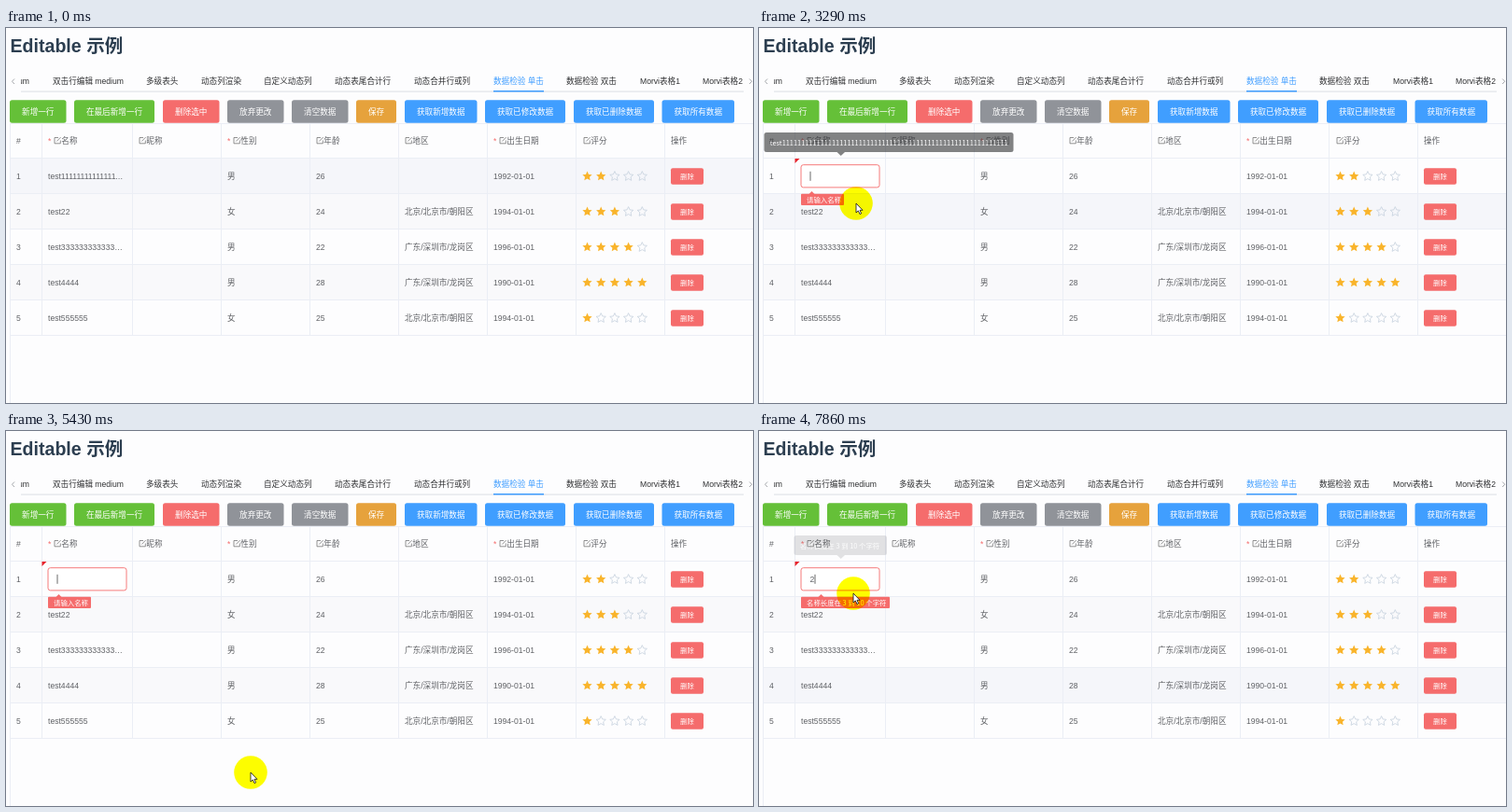
Animation, 800 px wide and 402 px high, one loop 8000 ms. Source, as an HTML page:

```html
<!DOCTYPE html>
<html lang="zh-CN">
<head>
<meta charset="utf-8">
<style>
html, body { margin: 0; width: 100%; height: 100%; overflow: hidden; background: #fdfdfe; }
svg { display: block; font: 8.6px "Liberation Sans", "Noto Sans CJK SC", "Noto Sans CJK", sans-serif; font-kerning: none; }
.tip { font: 7.4px "Noto Sans CJK SC", "Noto Sans CJK", sans-serif; }
.ones { letter-spacing: -.074em; }
.spot { mix-blend-mode: multiply; }
</style>
</head>
<body>
<svg id="stage" width="800" height="402" viewBox="0 0 800 402"></svg>
<script>
const stage = document.getElementById('stage');
const LOOP = 8000, STEPS = 56;
const GREEN = '#65c038', RED = '#f56c6c', GRAY = '#909399', AMBER = '#e6a23c', BLUE = '#409eff';
const INK = '#606266', LINE = '#ebeef5', TOP = 140, ROW = 38;

const rect = (x, y, w, h, fill, more = '') =>
  `<rect x="${x}" y="${y}" width="${w}" height="${h}" fill="${fill}" ${more}/>`;
const text = (x, y, s, fill = INK, more = '') => `<text x="${x}" y="${y}" fill="${fill}" ${more}>${s}</text>`;
const path = (d, fill, more = '') => `<path d="${d}" fill="${fill}" ${more}/>`;
const stroke = (d, color, width = 1) => path(d, 'none', `stroke="${color}" stroke-width="${width}"`);
const MID = 'text-anchor="middle"';

const tabs = [[50, '双击行编辑 medium'], [150, '多级表头'], [209, '动态列渲染'], [276, '自定义动态列'],
  [352, '动态表尾合计行'], [437, '动态合并行或列'], [522, '数据检验 单击'], [600, '数据检验 双击'],
  [679, 'Morvi表格1'], [746, 'Morvi表格2']];
const buttons = [[4, 60.5, '新增一行', GREEN], [73, 86, '在最后新增一行', GREEN], [168, 60.5, '删除选中', RED],
  [237, 60.5, '放弃更改', GRAY], [306, 60.5, '清空数据', GRAY], [375, 43, '保存', AMBER],
  [427, 77.5, '获取新增数据', BLUE], [513, 86, '获取已修改数据', BLUE], [608, 86, '获取已删除数据', BLUE],
  [702.5, 77.5, '获取所有数据', BLUE]];
// x, label, required
const heads = [[45, '名称', 1], [142, '昵称'], [237, '性别', 1], [332, '年龄'], [427, '地区'],
  [522, '出生日期', 1], [618, '评分']];
const rows = [
  ['test' + '1'.repeat(14) + '…', '男', 26, '', 1992, 2],
  ['test22', '女', 24, '北京/北京市/朝阳区', 1994, 3],
  ['test' + '3'.repeat(12) + '…', '男', 22, '广东/深圳市/龙岗区', 1996, 4],
  ['test4444', '男', 28, '广东/深圳市/龙岗区', 1990, 5],
  ['test555555', '女', 25, '北京/北京市/朝阳区', 1994, 1]];
// step, x, y of the pointer
const track = [[1, 384, 74], [3, 150, 140], [5, 100, 157], [8, 97, 158], [10, 121, 160], [12, 72, 165],
  [14, 90, 179], [21, 90, 179], [22, 102, 187], [23, 104, 188], [28, 200, 345], [32, 215, 354],
  [36, 262, 366], [38, 262, 366], [42, 110, 190], [44, 91, 165], [47, 90, 165], [51, 250, 384],
  [53, 250, 378], [54, 170, 270], [55, 101, 174]];

function pointer(k) {
  const i = track.findIndex(p => p[0] >= k);
  if (i < 1) return track[0].slice(1);
  const [a, ax, ay] = track[i - 1], [b, bx, by] = track[i];
  const u = (k - a) / (b - a), e = u * u * (3 - 2 * u);
  return [ax + (bx - ax) * e, ay + (by - ay) * e];
}

function hoverRow(k) {
  if (k < 3) return 0;
  const y = pointer(k - 1)[1];
  return y >= TOP && y < 185 ? 0 : y < TOP ? -1 : Math.floor((y - TOP) / ROW);
}

function star(cx, cy, full) {
  let d = '';
  for (let i = 0; i < 10; i++) {
    const r = i % 2 ? 2.6 : 5.4, a = i * Math.PI / 5;
    d += `${i ? 'L' : 'M'}${(cx + r * Math.sin(a)).toFixed(2)} ${(cy - r * Math.cos(a)).toFixed(2)}`;
  }
  return full ? path(d + 'Z', '#f9b42b') : stroke(d + 'Z', '#c6d1de', .8);
}

function topBar() {
  let s = text(4.5, 26, 'Editable 示例', '#2c3e50', 'font-size="19.6" font-weight="bold"');
  s += rect(16, 67.5, 774, 1.2, '#e1e4ea') + rect(522, 67, 54, 1.5, BLUE);
  s += `<svg x="16" y="45" width="774" height="20" viewBox="16 45 774 20">${text(25, 59.7, 'medium', '#303133', 'text-anchor="end"')}</svg>`;
  s += stroke('M9 54.5L6.5 57.2L9 60M796.2 54.5L798.7 57.2L796.2 60', GRAY, .8);
  for (const [x, t] of tabs) s += text(x, 59.7, t, x === 522 ? BLUE : '#303133');
  for (const [x, w, t, c] of buttons)
    s += rect(x, 77.3, w, 24.5, c, 'rx="2.5"') + text(x + w / 2, 92.8, t, '#fff', MID);
  return s;
}

function table(hover, editing) {
  let s = '';
  rows.forEach((r, i) => {
    const y = TOP + i * ROW, fill = i === hover ? '#f5f6fa' : i % 2 ? '#f9f9fb' : '#fdfdfe';
    s += rect(5, y, 795, ROW, fill);
  });
  let grid = 'M4.5 102V402M4 102.5H800';
  for (let i = 0; i < 6; i++) grid += `M4 ${TOP + i * ROW - .5}H800`;
  for (const x of [38, 135, 230, 325, 420, 515, 610, 705]) grid += `M${x + .5} 102V330`;
  s += stroke(grid, LINE);

  s += text(11, 124, '#') + text(712, 124, '操作');
  for (const [x, t, need] of heads) {
    const ix = need ? x + 6 : x;
    if (need) s += text(x, 124, '*', RED);
    s += `<g transform="translate(${ix} 116.5)">${stroke('M5 1H1v6.3h6.3V4M3.3 5L7.6 .6', '#777', .8)}</g>`;
    s += text(ix + 8.3, 124, t);
  }
  rows.forEach(([name, sex, age, area, year, score], i) => {
    const cy = TOP + ROW / 2 + i * ROW, y = cy + 3;
    s += text(11, y, i + 1);
    if (i || !editing) s += text(45, y, i ? name : `test<tspan class="ones">${name.slice(4)}</tspan>`);
    s += text(237, y, sex) + text(332, y, age) + text(427, y, area) + text(522, y, year + '-01-01');
    for (let n = 0; n < 5; n++) s += star(622.5 + n * 14.7, cy, n < score);
    s += rect(712, cy - 8.8, 35, 17.5, RED, 'rx="2"') + text(729.5, cy + 2.8, '删除', '#fff', MID + ' font-size="7.4"');
  });
  return s;
}

function editor(k, px) {
  const blank = k >= 18 && k < 48, typed = k >= 48;
  let s = rect(45, 146.7, 84, 24.2, '#fff', `rx="2.5" stroke="${RED}" stroke-width=".9"`);
  if (k >= 22) s += path('M38.5 140H43.5L38.5 145Z', '#e8232b');
  if (k < 18) {
    const ones = color => text(119.4, 162, '1'.repeat(18), color, 'class="ones" text-anchor="end"');
    const clip = (x, body) => `<svg x="${x}" y="148" width="${120 - x}" height="22" viewBox="${x} 148 ${120 - x} 22">${body}</svg>`;
    s += clip(54, ones(INK));
    if (k > 10) {
      const from = k >= 12 ? 54 : Math.max(54, px);
      s += clip(from, rect(from, 153.5, 119 - from, 10.5, '#3a8ff0') + ones('#fff'));
    } else s += rect(119, 154, .7, 10, '#444');
    s += path('M54 163.8H119', 'none', 'stroke="#e8474c" stroke-width=".9" stroke-dasharray="1.6 .8"');
  } else {
    if (typed) s += text(54.5, 162, '2');
    s += rect(typed ? 59.6 : 54.6, 153.8, .8, 10, '#444');
  }
  const w = blank ? 46 : 95, ax = blank ? 56.5 : 66.5;
  s += rect(45, 177.7, w, 12.3, RED, 'rx="1"') + path(`M${ax - 3} 178L${ax} 175L${ax + 3} 178Z`, RED);
  s += text(51, 186.6, blank ? '请输入名称' : '名称长度在 3 到 10 个字符', '#fff', 'class="tip"');
  return s;
}

function tooltip(x, w, t, opacity) {
  return `<g opacity="${opacity}">${rect(x, 112, w, 21, '#303133', 'rx="2.5"')}${path('M83.5 133H92L87.7 137Z', '#303133')}${text(x + 6.3, 125.5, t, '#fff', 'class="tip"')}</g>`;
}

function cursor(k, x, y) {
  const beam = (k >= 10 && k < 22) || (x > 45 && x < 129 && y > 147 && y < 171);
  const shape = beam
    ? stroke('M-2 -5H-.5L0 -4.5L.5 -5H2M0 -4.5V4.5M-2 5H-.5L0 4.5L.5 5H2', '#222', .9)
    : path('M0 0V10L2.3 7.9L4 11.6L5.6 10.9L4 7.3H7Z', '#fff', 'stroke="#111" stroke-width=".8"');
  return `<circle class="spot" cx="${x}" cy="${y}" r="17.8" fill="#ff0"/><g transform="translate(${x} ${y})">${shape}</g>`;
}

function draw(k) {
  const [x, y] = pointer(k), editing = k >= 5;
  let s = topBar() + table(hoverRow(k), editing);
  if (editing) s += editor(k, x);
  const shown = k < 3 ? 0 : k === 3 ? .4 : k < 23 ? 1 : k === 23 ? .6 : k === 24 ? .15 : 0;
  if (shown) s += tooltip(5.5, 267, 'test' + '1'.repeat(59), shown);
  if (k === 55) s += tooltip(37.5, 99.5, '名称长度在 3 到 10 个字符', .13);
  if (k) s += cursor(k, x, y);
  stage.innerHTML = s;
}

let last = -1;
const start = performance.now();
function tick(now) {
  const t = Math.max(0, now - start) % LOOP;
  const k = Math.floor((t + 5) * STEPS / LOOP) % STEPS;
  if (k !== last) draw(last = k);
  requestAnimationFrame(tick);
}
draw(0);
requestAnimationFrame(tick);
</script>
</body>
</html>
```
